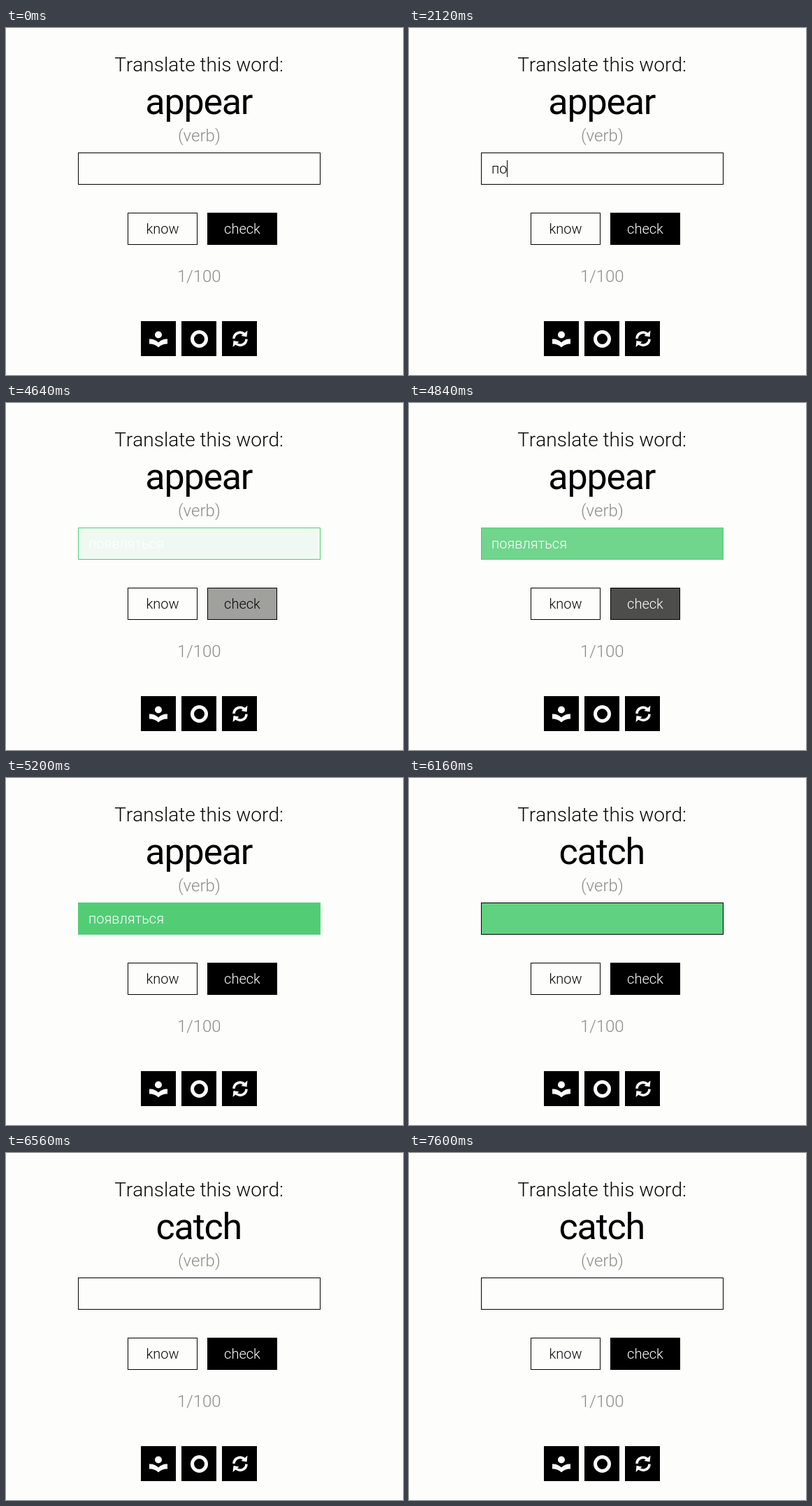
Animation of 568 by 496 pixels, one loop 8 s. Source, as an HTML page:

```html
<!DOCTYPE html>
<html lang="en">
<head>
<meta charset="utf-8">
<style>
  html, body { margin: 0; width: 100%; height: 100%; overflow: hidden; background: #fdfdfc; }
  svg { display: block; }
  text { font: 300 20px Roboto, sans-serif; font-kerning: none; fill: #080808; }
  .mid { text-anchor: middle; }
  .soft { font-size: 24px; fill: #8c8c85; }
  .box { fill: #fdfdfc; stroke: #000; }
  .icon { fill: #fdfdfc; }
  .line { fill: none; stroke: #fdfdfc; }
</style>
</head>
<body>
<svg width="568" height="496" viewBox="0 0 568 496">
  <text class="mid" x="276" y="62" style="font-size:28px">Translate this word:</text>
  <text class="mid" id="word" x="275.8" y="123" style="font-size:52px;font-weight:400;letter-spacing:-1.2px;fill:#000"></text>
  <text class="mid soft" x="276.3" y="162">(verb)</text>

  <rect class="box" id="field" x="103.5" y="178.5" width="346" height="45"/>
  <text id="typed" x="118" y="208"></text>
  <rect id="caret" y="189" width="1" height="24"/>

  <rect class="box" x="174.5" y="264.5" width="99" height="45"/>
  <text class="mid" x="224" y="294">know</text>
  <rect class="box" id="check" x="288.5" y="264.5" width="99" height="45"/>
  <text class="mid" id="checkLabel" x="338" y="294">check</text>

  <text class="mid soft" x="276.3" y="363">1/100</text>

  <path d="M193 419h50v50h-50zM251 419h50v50h-50zM309 419h50v50h-50z"/>
  <g class="icon">
    <circle cx="218" cy="438.5" r="5"/>
    <path d="M205 444.5Q212 444 218 449.5Q224 444 231 444.5V451.5Q223 451.5 218 456.5Q213 451.5 205 451.5Z"/>
  </g>
  <circle class="line" cx="276.5" cy="444.5" r="10" stroke-width="5"/>
  <g id="arrow">
    <path class="line" d="M326 444A9 9 0 0 1 341 437.6" stroke-width="3.6"/>
    <path class="icon" d="M345.5 432.5L344.5 441.5L336.5 440Z"/>
  </g>
  <use href="#arrow" transform="rotate(180 335 444.3)"/>
</svg>
<script>
const LOOP = 8000;
const ANSWER = 'появляться';
const KEYS = [1680, 2120, 2240, 2360, 2520, 2640, 2840, 3000, 3120, 3240];
const CARET_ON = [[840, 1360], [1680, 3760], [4240, 4520], [7080, 7600]];
const HOVER = 4260, CLICK = 4600, LEAVE = 4700, NEXT = 6120, FADE = 460;
const PAPER = [253, 253, 252], GREEN = [82, 205, 118], BLACK = [0, 0, 0], GREY = [163, 163, 160];

const $ = id => document.getElementById(id);
const rgb = c => `rgb(${c.map(Math.round)})`;
const mix = (a, b, p) => rgb(a.map((v, i) => v + (b[i] - v) * p));
const bezier = (a, b, s) => 3 * a * s * (1 - s) ** 2 + 3 * b * s * s * (1 - s) + s ** 3;

// CSS "ease", cubic-bezier(.25, .1, .25, 1), begun at the given time
function eased(t, start) {
  const x = Math.min(1, Math.max(0, (t - start) / FADE));
  let lo = 0, hi = 1;
  for (let i = 0; i < 20; i++) {
    const s = (lo + hi) / 2;
    if (bezier(.25, .25, s) < x) lo = s; else hi = s;
  }
  return bezier(.1, 1, hi);
}

function draw(t) {
  const next = t >= NEXT, correct = t >= CLICK && !next, hover = t >= HOVER && t < LEAVE;
  const typed = $('typed'), caret = $('caret');

  $('word').textContent = next ? 'catch' : 'appear';
  typed.textContent = next ? '' : ANSWER.slice(0, KEYS.filter(k => k <= t).length);
  typed.style.fill = correct ? '#fff' : '';

  $('field').style.fill = mix(PAPER, GREEN, next ? 1 - eased(t, NEXT) : eased(t, CLICK));
  $('field').style.stroke = correct ? rgb(GREEN) : '';

  const blink = CARET_ON.some(([on, off]) => t >= on && t < off);
  caret.style.display = blink ? '' : 'none';
  caret.setAttribute('x', 118 + Math.round(typed.textContent ? typed.getComputedTextLength() : 0));

  $('check').style.fill = mix(BLACK, GREY, eased(t, HOVER) * (1 - eased(t, LEAVE)));
  $('checkLabel').style.fill = hover ? '' : '#fff';
}

const begin = performance.now();
function tick() {
  draw((performance.now() - begin) % LOOP);
  requestAnimationFrame(tick);
}
tick();
</script>
</body>
</html>
```
